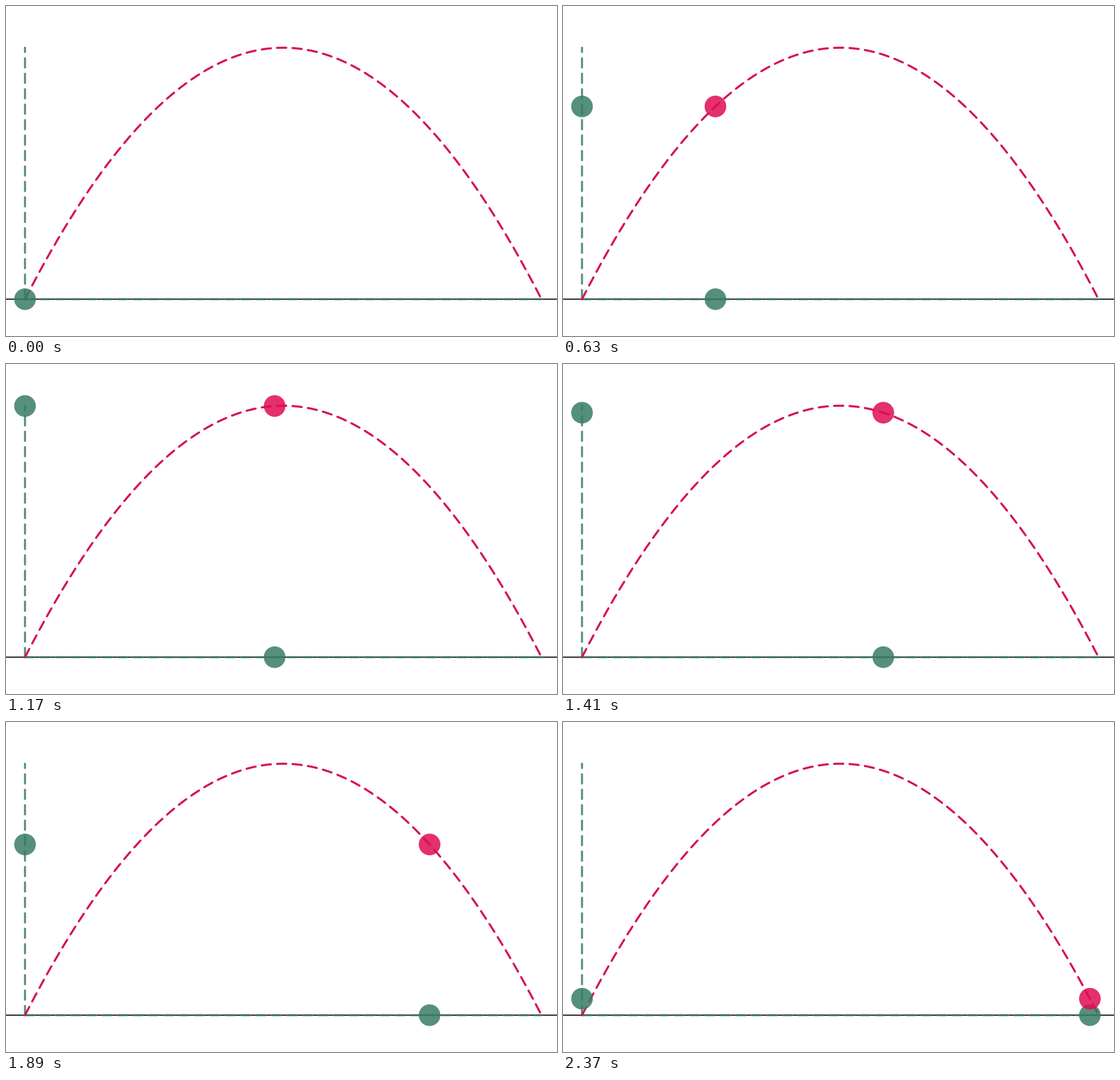
Recreate the animation shown at these times as a matplotlib script. Size 835 by 500 pixels, loop 2.4 s.

```python
import numpy as np
import matplotlib.pyplot as plt
from matplotlib.animation import FuncAnimation
from matplotlib.patches import Circle

W, H, DPI = 835, 500, 100
FRAMES, STEP = 80, 30
LOOP = FRAMES * STEP
DELAY = 10                      # ms before the throw begins

X0, X1 = 28.8, 811.5
GROUND, HEIGHT = 444.2, 381.0
RADIUS = 16.4
UNIT = 1.56                     # pixels per drawing unit
ALPHA = 0.85
GREEN, PINK, PINK_LINE = "#387b66", "#e00c54", "#d60f53"


def px(size):
    """Pixels to points."""
    return size * 72 / DPI


def path(u):
    """Position of the projectile at progress u in 0..1."""
    return X0 + (X1 - X0) * u, GROUND - HEIGHT * 4 * u * (1 - u)


fig = plt.figure(figsize=(W / DPI, H / DPI), dpi=DPI, facecolor="white")
ax = fig.add_axes([0, 0, 1, 1])
ax.set_xlim(0, W)
ax.set_ylim(H, 0)
ax.axis("off")


def dashed(x, y, color, alpha, z):
    ax.plot(x, y, color=color, alpha=alpha, lw=px(2 * UNIT), dashes=(4.5, 3),
            dash_capstyle="round", snap=False, zorder=z)


def ball(color, z):
    return ax.add_patch(Circle((X0, GROUND), RADIUS, fc=color, lw=0,
                               alpha=ALPHA, zorder=z))


ax.plot([-5, W + 5], [GROUND, GROUND], color="black", lw=px(UNIT),
        snap=False, zorder=1)
dashed([X0, X1], [GROUND, GROUND], GREEN, ALPHA, 2)
dashed([X0, X0], [GROUND, GROUND - HEIGHT], GREEN, ALPHA, 2)
dashed(*path(np.linspace(0, 1, 400)), PINK_LINE, 1, 3)

shadow_x = ball(GREEN, 4)
projectile = ball(PINK, 5)
shadow_y = ball(GREEN, 6)


def update(i):
    t = i * STEP - DELAY
    x, y = path(max(t, 0) / LOOP)
    shadow_x.center = x, GROUND
    projectile.center = x, y
    shadow_y.center = X0, y
    # at rest the three coincide, so only one is drawn
    projectile.set_visible(t > 0)
    shadow_y.set_visible(t > 0)
    return shadow_x, projectile, shadow_y


anim = FuncAnimation(fig, update, frames=FRAMES, interval=STEP,
                     repeat=True, repeat_delay=0, blit=False)
plt.show()
```
